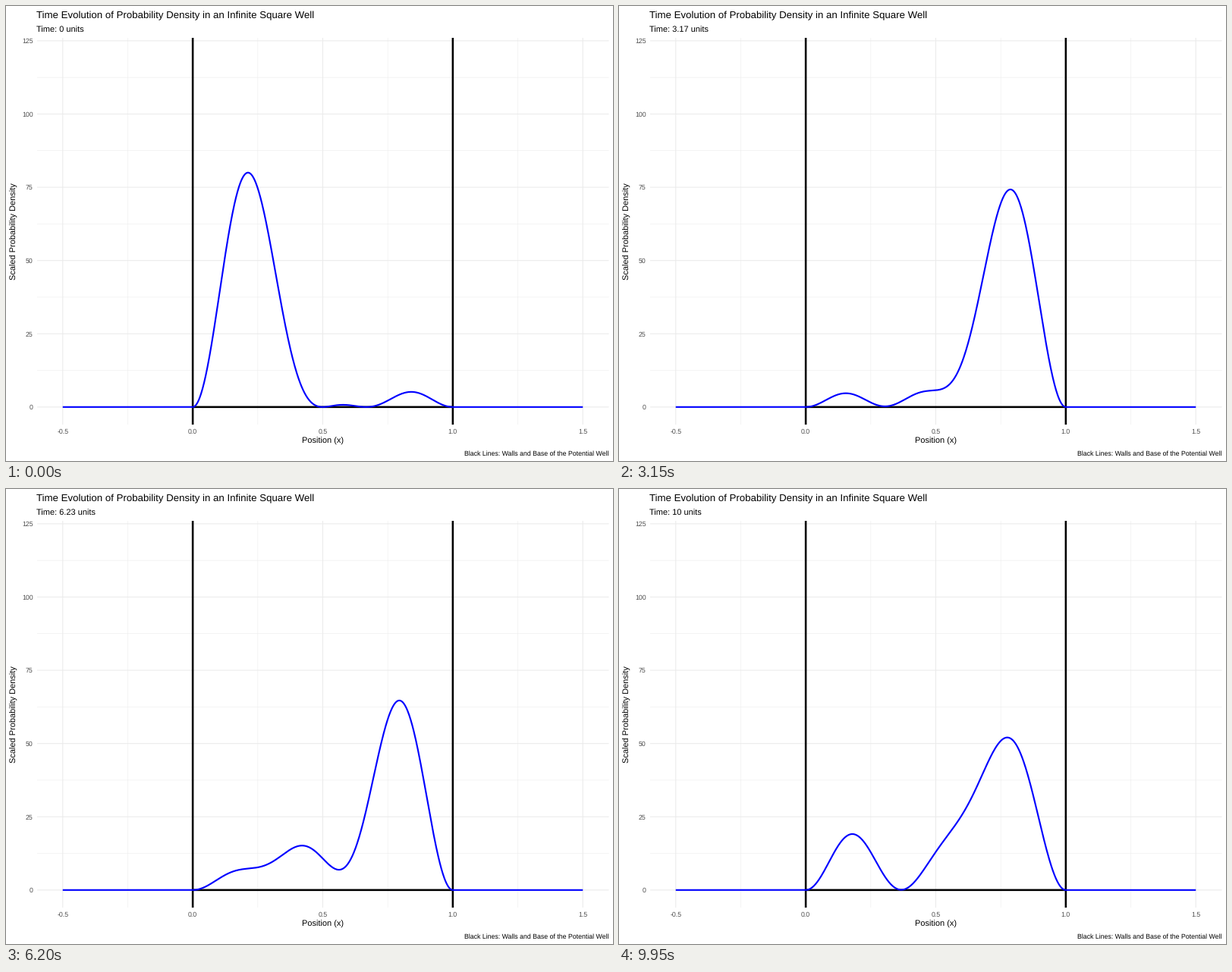
Recreate the animation shown at these times as a matplotlib script. Size 800 px wide and 600 px high, loop 10000 ms.

```python
import matplotlib.pyplot as plt
import numpy as np
from matplotlib.animation import FuncAnimation

W, H, DPI = 800, 600, 72  # at 72 dpi one point equals one pixel
FRAMES, INTERVAL = 200, 50
T_END = 10
LEFT, RIGHT, TOP, BOTTOM = 40.5, 794.5, 42.0, 552.0
GRID, TICK = "#ebebeb", "#4d4d4d"
PEAK = 80

plt.rcParams.update({
    "font.family": "Liberation Sans",
    "text.hinting": "none",
    "lines.solid_capstyle": "butt",
})

fig = plt.figure(figsize=(W / DPI, H / DPI), dpi=DPI, facecolor="white")
ax = fig.add_axes([LEFT / W, 1 - BOTTOM / H, (RIGHT - LEFT) / W, (BOTTOM - TOP) / H])
ax.set_xlim(-0.6, 1.6)
ax.set_ylim(-6, 126)
ax.axis("off")


def label(x, y, text, size, color="black", ha="left", rotation=0):
    """Place text with its baseline at (x, y) pixels from the top left."""
    return fig.text(x / W, 1 - y / H, text, fontsize=size, color=color, ha=ha,
                    va="baseline", rotation=rotation, rotation_mode="anchor")


def line(xs, ys, color, width, z):
    return ax.plot(xs, ys, color=color, lw=width, zorder=z, snap=False)[0]


def to_px(x):
    return LEFT + (x + 0.6) / 2.2 * (RIGHT - LEFT)


def to_py(y):
    return BOTTOM - (y + 6) / 132 * (BOTTOM - TOP)


# Grid: minor lines lie halfway between the major ones
for x in np.arange(-0.25, 1.5, 0.5):
    line([x, x], [-6, 126], GRID, 0.53, 1)
for y in np.arange(12.5, 125, 25):
    line([-0.6, 1.6], [y, y], GRID, 0.53, 1)
for x in np.arange(-0.5, 1.6, 0.5):
    line([x, x], [-6, 126], GRID, 1.07, 2)
    label(to_px(x), 564, f"{x:.1f}", 8.8, TICK, "center")
for y in range(0, 126, 25):
    line([-0.6, 1.6], [y, y], GRID, 1.07, 2)
    label(35.6, to_py(y) + 3.2, str(y), 8.8, TICK, "right")

# Well
for x in (0, 1):
    line([x, x], [-6, 126], "black", 2.56, 3)
line([0, 1], [0, 0], "black", 2.56, 3)

label(LEFT, 16, "Time Evolution of Probability Density in an Infinite Square Well", 13.2)
clock = label(LEFT, 35, "", 11)
label((LEFT + RIGHT) / 2, 577, "Position (x)", 11, ha="center")
label(13.5, (TOP + BOTTOM) / 2, "Scaled Probability Density", 11, ha="center", rotation=90)
label(RIGHT, 593, "Black Lines: Walls and Base of the Potential Well", 8.8, ha="right")

# Equal mix of the three lowest states, with hbar = mass = width = 1
x = np.linspace(-0.5, 1.5, 1001)
n = np.arange(1, 4)[:, None]
states = np.where((x >= 0) & (x <= 1), np.sin(n * np.pi * x), 0)
energy = (n * np.pi) ** 2 / 2


def density(t):
    return np.abs((states * np.exp(-1j * energy * t)).sum(axis=0)) ** 2


scale = PEAK / density(0).max()
curve = line(x, np.zeros_like(x), "blue", 2.13, 4)


def update(frame):
    t = T_END * frame / (FRAMES - 1)
    curve.set_ydata(scale * density(t))
    clock.set_text(f"Time: {round(t, 2):g} units")
    return curve, clock


anim = FuncAnimation(fig, update, frames=FRAMES, interval=INTERVAL, repeat=True)
plt.show()
```
